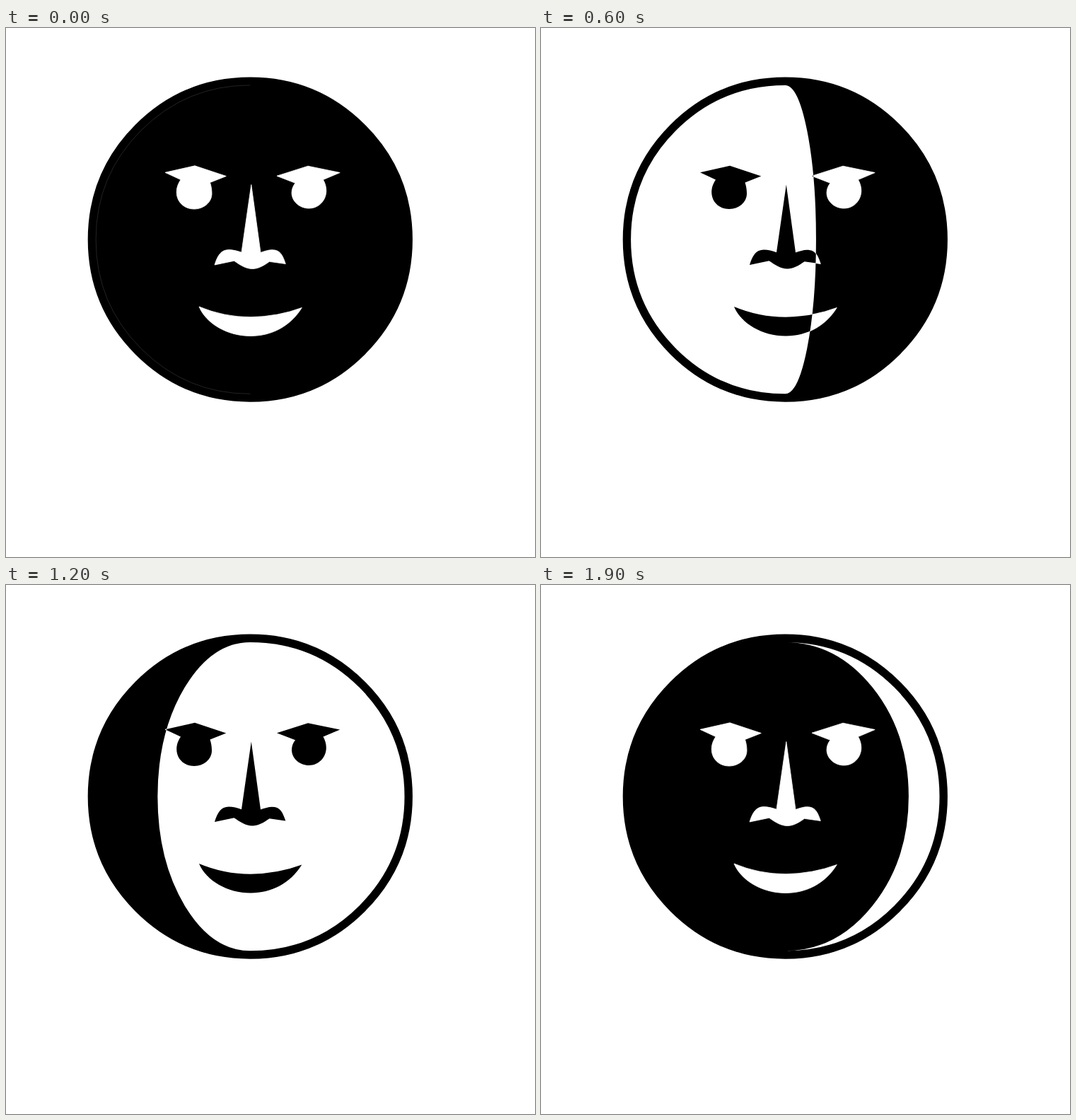
These frames come from a looping animation (748x748 px, 2000 ms). An HTML page:

```html
<!DOCTYPE html>
<html lang="en">
<head>
<meta charset="utf-8">
<title>Moon phases</title>
<style>
  html, body { margin: 0; width: 100%; height: 100%; overflow: hidden; background: #fff; }
  svg { display: block; width: 100vw; height: 100vh; }
</style>
</head>
<body>
<svg viewBox="0 0 748 748">
  <defs>
    <path id="lit"/>
    <clipPath id="litClip"><use href="#lit"/></clipPath>
    <g id="face">
      <path d="M225 204.3L267 194.8 311.3 209.5 288.5 218.5C290 223 291 228 291 234C291 247 279 256 266 256C252 256 241.2 246 241.2 232C241.2 225 244 219 247 214.5Z"/>
      <path d="M383 209.2L427 195.2 472.2 204.5 448.5 214.5C451 219 452.8 224 452.8 230C452.8 244 442 255 428.5 255C415 255 404 245 404 233C404 228 406 223 409 219.3Z"/>
      <path d="M346.8 221.5L360 317.5C366 315.5 371 313.7 376 313.7C388 313.7 391 321 395.3 333.5L372.5 330.3C363 337 356 340.5 348.5 340.5C339 340.5 331 335 322.5 329.3L295 335C299 322 304 313.6 315 313.6C321 313.6 327 315.3 333 317.2Z"/>
      <path d="M273 394Q308 408.7 346 408.7Q385 408 418.3 395.5C402 422 375 435.5 346 435.5C313 435.5 283 418 273 394Z"/>
    </g>
  </defs>
  <path id="disc"/>
  <path id="hairline" fill="none" stroke="#333" stroke-width=".7"/>
  <use href="#face" fill="#fff" stroke="#fff" stroke-width=".8" stroke-miterlimit="20"/>
  <use href="#lit" fill="#fff"/>
  <use href="#face" clip-path="url(#litClip)"/>
</svg>
<script>
const CX = 345.3, CY = 299.1, RIM = 229.6, INNER = 218.2;
const STEP_MS = 100, HALF_STEPS = 10;
const [disc, lit, hairline] = ['disc', 'lit', 'hairline'].map(id => document.getElementById(id));
const start = performance.now();
let shown = -1;

// Half an ellipse as four quadratic curves; a negative rx bulges left.
function halfEllipse(rx, ry, upward = false) {
  const at = (angle, scale = 1) => {
    const y = (upward ? 1 : -1) * ry * scale * Math.cos(angle);
    return `${CX + rx * scale * Math.sin(angle)} ${CY + y}`;
  };
  const half = Math.PI / 8;
  let path = '';
  for (let i = 1; i < 8; i += 2) {
    path += `Q${at(i * half, 1 / Math.cos(half))} ${at((i + 1) * half)}`;
  }
  return path;
}

const topPoint = ry => `M${CX} ${CY - ry}`;

// The lit area lies between one half of the rim and an elliptical terminator.
function litPath(step) {
  const side = step < HALF_STEPS ? -1 : 1;
  const offset = INNER * (2 * (step % HALF_STEPS) / HALF_STEPS - 1);
  return topPoint(INNER) + halfEllipse(side * INNER, INNER) + halfEllipse(offset, INNER, true) + 'Z';
}

function draw(now) {
  const step = Math.floor(Math.max(0, now - start) / STEP_MS) % (2 * HALF_STEPS);
  if (step !== shown) {
    shown = step;
    lit.setAttribute('d', step ? litPath(step) : '');
    hairline.style.display = step ? 'none' : '';
  }
  requestAnimationFrame(draw);
}

disc.setAttribute('d', topPoint(RIM) + halfEllipse(RIM, RIM) + halfEllipse(-RIM, RIM, true) + 'Z');
hairline.setAttribute('d', topPoint(INNER) + halfEllipse(-INNER, INNER));
draw(start);
</script>
</body>
</html>
```
